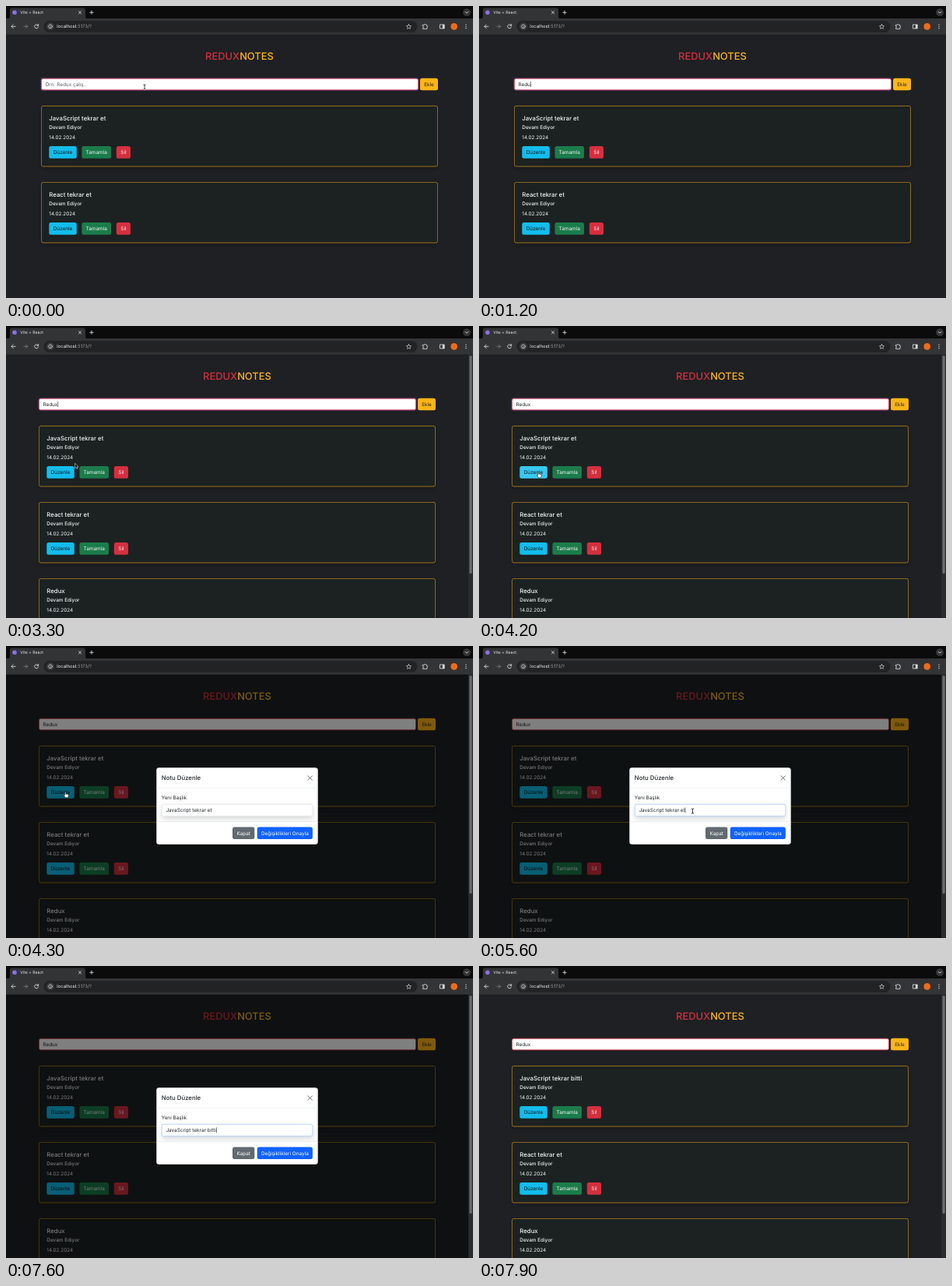
These frames come from a looping animation (600x375 px, 8 s). An HTML page:

```html
<!DOCTYPE html>
<html lang="tr">
<head>
<meta charset="utf-8">
<title>Redux Notes</title>
<style>
  html, body { margin: 0; width: 100%; height: 100%; overflow: hidden; background: #1e2023; }
  svg { display: block; width: 600px; height: 375px; }
  text { font: 6.4px Inter, "Open Sans", sans-serif; text-rendering: geometricPrecision; white-space: pre; }
  .h { font-size: 7.8px; font-weight: 500; }
  .m { font-weight: 500; }
  .line { fill: none; stroke: #d4d6d8; stroke-width: .9; stroke-linecap: round; stroke-linejoin: round; }
</style>
</head>
<body>
<svg id="stage" viewBox="0 0 600 375"></svg>
<script>
const LOOP = 8000;
const ADD = 1800, OPEN = 4300, FOCUS = 5300, CLOSE = 7800;
const RED = '#d62f3e', AMBER = '#ffb516', CYAN = '#12bdec', GREEN = '#1b7c4b', DARK = '#191b1e';

// Each entry: time of the key press and the text after it.
const addKeys = [[-600, ''], [500, 'R'], [700, 'Re'], [900, 'Red'], [1100, 'Redu'], [1300, 'Redux']];
const stem = 'JavaScript tekrar ';
const editKeys = [[FOCUS, 'et'], [6000, 'e'], [6300, ''], [6600, 'b'], [6900, 'bi'],
  [7100, 'bit'], [7300, 'bitt'], [7500, 'bitti']].map(([t, s]) => [t, stem + s]);

// Pointer stops: time, x, y.
const stops = [[2600, 178, 104], [3500, 77, 190], [4500, 77, 190], [5200, 274.5, 212]];

const rect = (x, y, w, h, fill, extra = '') =>
  `<rect x="${x}" y="${y}" width="${w}" height="${h}" fill="${fill}" ${extra}/>`;
const text = (x, y, s, fill = '#f1f2f3', extra = '') =>
  `<text x="${x}" y="${y}" fill="${fill}" ${extra}>${s}</text>`;
const line = (d, extra = '') => `<path class="line" d="${d}" ${extra}/>`;
const button = (x, y, w, h, fill, label, color, id = '') =>
  rect(x, y, w, h, fill, `rx="2.5" ${id}`) +
  text(x + w / 2, y + h / 2 + 2.3, label, color, 'text-anchor="middle"');

const card = (y, title, id) => `<g id="${id}">` +
  rect(45.4, y + .4, 509.2, 77.6, '#1e2023', 'rx="2.5" stroke="#b58416" stroke-width=".8" filter="url(#soft)"') +
  text(55.3, y + 18.6, title, '#f4f5f6', `class="h" id="${id}Title"`) +
  text(55.3, y + 30.3, 'Devam Ediyor', '#f1f2f3', 'class="m"') +
  text(55.3, y + 42.6, '14.02.2024') +
  button(55.3, y + 52, 35.5, 15.7, CYAN, 'Düzenle', '#101416', `id="${id}Edit"`) +
  button(97.4, y + 52, 37.6, 15.7, GREEN, 'Tamamla', '#f4f5f6') +
  button(141.8, y + 52, 18.2, 15.7, RED, 'Sil', '#f4f5f6') + '</g>';

const chrome =
  rect(0, 0, 600, 17, '#0b0b0c') + rect(0, 16, 600, 20.5, '#333435') +
  '<path d="M2 16.5q3 0 3-3v-8q0-3 3-3h91q3 0 3 3v8q0 3 3 3z" fill="#333435"/>' +
  '<circle cx="11" cy="8.3" r="2.8" fill="#8b6cf2"/>' +
  text(18.3, 10.2, 'Vite + React', '#e6e7e8', 'style="font-size:5.2px"') +
  line('M93.4 6.7l3.2 3.2m0-3.2l-3.2 3.2M107.8 8.3h4.4M110 6.1v4.4') +
  '<circle cx="592" cy="8.2" r="4.9" fill="#343536"/>' + line('M590.2 7.4l1.8 1.8l1.8-1.8') +
  line('M12 26.3H7m2.3-2.3L7 26.3l2.3 2.3') +
  line('M22.8 26.3h5m-2.3-2.3l2.3 2.3l-2.3 2.3', 'style="stroke:#77797b"') +
  line('M41.3 24.9a2.5 2.5 0 1 0 .3 2M41.6 23.3v1.9h-1.9') +
  rect(48.5, 19, 480, 14.8, '#222325', 'rx="7.4"') +
  '<circle cx="57" cy="26.3" r="5" fill="#3a3b3d"/>' +
  '<circle cx="57" cy="26.3" r="2.4" class="line" style="stroke-width:.7"/>' +
  line('M57 26.2v1.2M57 25v.1', 'style="stroke-width:.7"') +
  text(65.3, 28.4, 'localhost<tspan fill="#9b9da0">:5173/?</tspan>', '#f1f2f3', 'style="font-size:5.9px"') +
  line('M517.5 23.5l.9 1.9 2.1.3-1.5 1.5.4 2.1-1.9-1-1.9 1 .4-2.1-1.5-1.5 2.1-.3z', 'style="stroke-width:.7"') +
  line('M535.7 24.3h1.7a.9.9 0 0 1 1.8 0h1.6v1.8a.9.9 0 0 1 0 1.8v1.5h-5.1v-1.7a.9.9 0 0 0 0-1.8z') +
  line('M557.8 23.9h5.4v5h-5.4z') + rect(560.8, 24, 2.4, 4.9, '#d4d6d8') +
  '<circle cx="575.7" cy="26.4" r="4.3" fill="#f26a16"/>' +
  [24, 26.4, 28.8].map(y => `<circle cx="591" cy="${y}" r=".7" fill="#d4d6d8"/>`).join('');

const page = '<g id="page">' +
  `<text x="300" y="69.2" text-anchor="middle" style="font-size:12.9px" class="m" fill="${AMBER}">` +
  `<tspan fill="${RED}">REDUX</tspan>NOTES</text>` +
  rect(44.2, 92, 486.6, 17, '#3b3168', 'rx="3.4" id="halo"') +
  rect(45.4, 93.2, 484.2, 14.6, '#fff', `rx="2.4" stroke="${RED}" stroke-width=".8"`) +
  text(50.4, 102.8, '', '#212529', 'id="note"') + rect(0, 97, .6, 7, '#222', 'id="noteCaret"') +
  button(532, 92.8, 23, 15.4, AMBER, 'Ekle', '#212529') +
  card(128, 'JavaScript tekrar et', 'js') + card(226, 'React tekrar et', 'react') +
  card(324, 'Redux', 'redux') + '</g>';

const modal = '<g id="modal">' + rect(0, 36.5, 594, 338.5, '#000', 'opacity=".5"') +
  rect(193.3, 156.3, 207.4, 98.4, '#fff', 'rx="3.3"') +
  text(199.8, 172.4, 'Notu Düzenle', '#212529', 'class="h"') +
  line('M388 166.8l5.4 5.4m0-5.4l-5.4 5.4', 'style="stroke:#555"') +
  rect(193.3, 182.2, 207.4, .5, '#dee2e6') + rect(193.3, 225.2, 207.4, .5, '#dee2e6') +
  text(199.8, 196.8, 'Yeni Başlık', '#212529') +
  rect(200.2, 203.2, 193.6, 15.2, '#fff', 'rx="2.4" stroke-width=".6" filter="url(#soft)" id="field"') +
  text(205.4, 213.1, '', '#212529', 'id="edit"') + rect(0, 207.3, .6, 7, '#222', 'id="editCaret"') +
  button(291, 232.4, 28.3, 15.7, '#626a71', 'Kapat', '#fff') +
  button(322.7, 232.4, 71.2, 15.7, '#0f62fb', 'Değişiklikleri Onayla', '#fff') + '</g>';

const bar = '<g id="bar">' + rect(594, 36.5, 6, 338.5, '#2a2b2d') +
  rect(595.4, 38, 3.3, 280, '#6c6d6f', 'rx="1.6"') + '</g>';

const ibeam = 'M-1.5-3.2q1.5 0 1.5 1.2v4q0 1.2-1.5 1.2M1.5-3.2q-1.5 0-1.5 1.2M0 2q0 1.2 1.5 1.2';
const pointer = '<g id="pointer">' +
  `<g id="beam" fill="none"><path d="${ibeam}" stroke="#fff" stroke-width="1.5"/>` +
  `<path d="${ibeam}" stroke="#111" stroke-width=".8"/></g>` +
  '<path id="hand" d="M-1.4-2.2q.7-.7 1.3 0V.1q2.8-.1 3.4 1.1v1.7L2.5 4.8H-.6L-2.8 1.7q.4-.9 1.4-.1z" ' +
  'fill="#fff" stroke="#111" stroke-width=".6" stroke-linejoin="round"/>' +
  '<path id="arrow" d="M-1-3v6.4l1.5-1.3 1 2.2 1-.5-1-2.1h2z" fill="#111" stroke="#fff" stroke-width=".5"/></g>';

const $ = id => document.getElementById(id);
$('stage').innerHTML =
  '<filter id="soft" x="-10%" y="-30%" width="120%" height="180%">' +
  '<feDropShadow dx="0" dy="3.3" stdDeviation="3.3" flood-opacity=".15"/></filter>' +
  rect(0, 0, 600, 375, '#1e2023') + page + bar + modal + chrome + pointer;

const show = (id, on) => $(id).setAttribute('display', on ? 'inline' : 'none');
const last = (list, t) => list.filter(k => k[0] <= t).pop() || list[0];

// Writes a field's text and places its blinking caret behind it.
function type(id, keys, t, focused, placeholder = '') {
  const [at, value] = last(keys, t), el = $(id);
  el.textContent = value || placeholder;
  el.setAttribute('fill', value ? '#212529' : '#595f65');
  const x = +el.getAttribute('x') + (value ? el.getComputedTextLength() : 0);
  $(id + 'Caret').setAttribute('x', x + .2);
  show(id + 'Caret', focused && (t - at) % 1000 < 500);
}

function pointerAt(t) {
  const i = Math.max(0, stops.filter(s => s[0] <= t).length - 1);
  const a = stops[i], b = stops[i + 1] || a;
  const p = b === a ? 0 : Math.min(1, Math.max(0, (t - a[0]) / (b[0] - a[0])));
  const e = p * p * (3 - 2 * p);
  return [a[1] + (b[1] - a[1]) * e, a[2] + (b[2] - a[2]) * e];
}

function draw(t) {
  const added = t >= ADD, open = t >= OPEN && t < CLOSE;
  $('page').setAttribute('transform', `translate(${added ? -3 : 0})`);
  show('redux', added);
  show('bar', added);
  show('halo', t < OPEN);
  show('modal', open);
  type('note', addKeys, t, t < OPEN, 'Örn: Redux çalış..');
  type('edit', editKeys, t, t >= FOCUS);
  $('field').setAttribute('stroke', t >= FOCUS ? '#86b7fe' : '#d5dae0');
  $('jsTitle').textContent = stem + (t >= CLOSE ? 'bitti' : 'et');

  const [x, y] = pointerAt(t);
  const hover = t > 2600 && t < OPEN && x > 52 && x < 88 && y > 180 && y < 196;
  const beam = y < 108 || (open && x > 200 && y > 203);
  const hand = hover || (open && t < stops[2][0]);
  $('jsEdit').setAttribute('fill', hover ? '#38c9f0' : CYAN);
  $('pointer').setAttribute('transform', `translate(${x} ${y})`);
  show('pointer', t < addKeys[1][0] || (t >= 2600 && t < editKeys[1][0]));
  show('beam', beam);
  show('hand', hand);
  show('arrow', !beam && !hand);
}

const start = performance.now();
(function tick() {
  draw((performance.now() - start) % LOOP);
  requestAnimationFrame(tick);
})();
</script>
</body>
</html>
```
